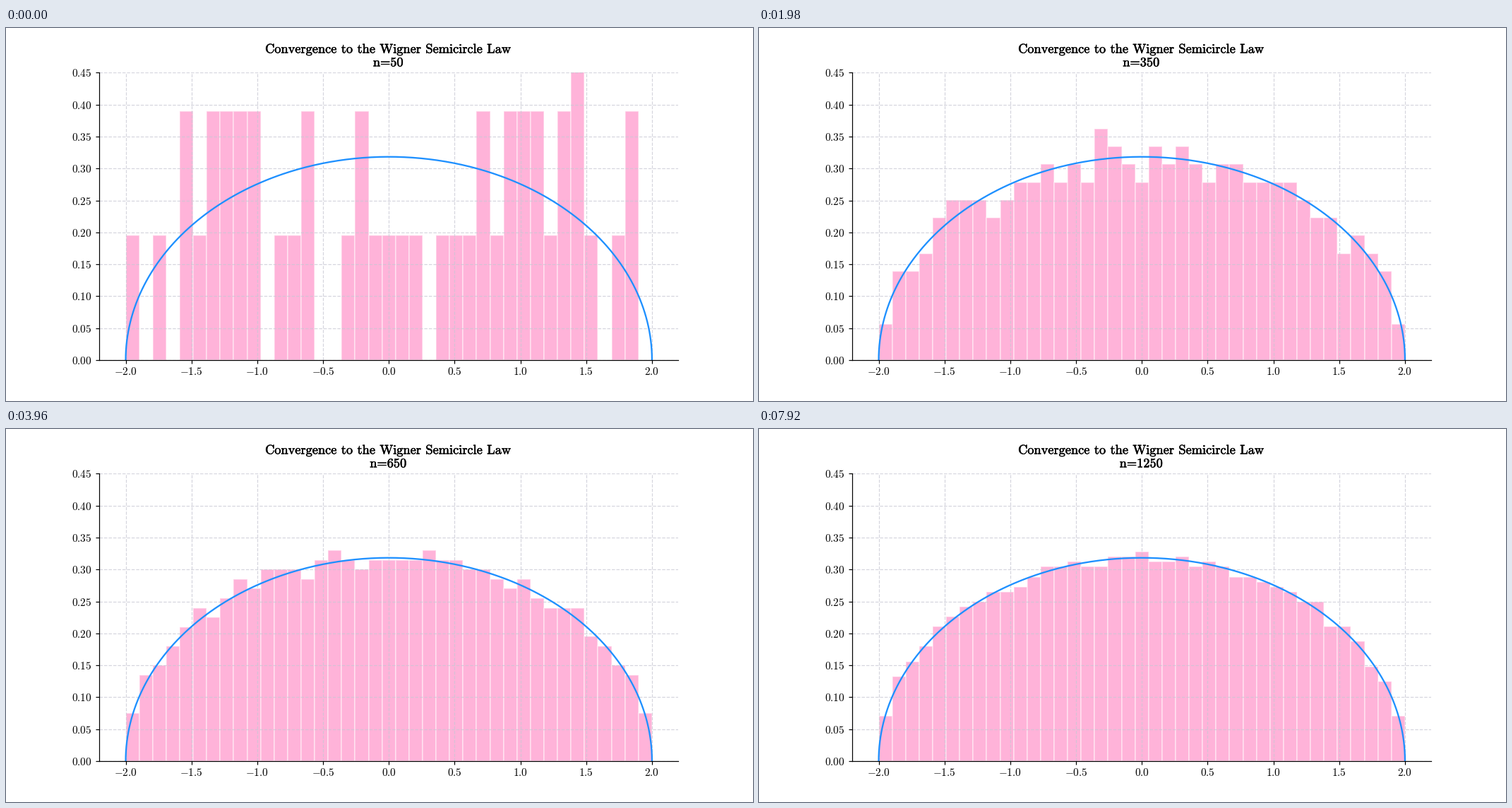
Write a matplotlib script that moves like this. It is 1058x529 px and loops after 8000 ms.

```python
import numpy as np
import matplotlib.pyplot as plt
from matplotlib.animation import FuncAnimation
from matplotlib.patheffects import withStroke

W, H, DPI = 1058, 529, 128
LOOP, TICK, HOLD = 8000, 40, 330
PT = 110 / DPI  # the chart is styled in points at 110 dpi

BINS = 39
EDGES = np.linspace(-2, 2, BINS + 1)
WIDTH = EDGES[1] - EDGES[0]
SIZES = range(50, 1251, 50)


def semicircle(x):
    return np.sqrt(np.maximum(4 - x**2, 0)) / (2 * np.pi)


def bar_heights(n):
    """Density of n eigenvalues; bin counts stray by about one from the law."""
    expected = n * WIDTH * semicircle(EDGES[:-1] + WIDTH / 2)
    noise = np.random.default_rng(n).normal(0, 0.85, BINS)
    # Bins near the rim hold few eigenvalues and stray less.
    spread = np.sqrt(expected / expected.max())
    counts = np.maximum(np.rint(expected + noise * spread), 0)
    return counts / (n * WIDTH)


def roman(text):
    """Upright Computer Modern with text-style spacing."""
    text = text.replace(" ", r"\hspace{0.4}")
    text = text.replace("=", r"\hspace{-0.2}=\hspace{-0.2}")
    return rf"$\mathrm{{{text}}}$"


plt.rcParams["mathtext.fontset"] = "cm"
HEIGHTS = [bar_heights(n) for n in SIZES]

fig = plt.figure(figsize=(W / DPI, H / DPI), dpi=DPI, facecolor="white")
ax = fig.add_axes([0.125, 0.11, 0.775, 0.77])
ax.set_xlim(-2.2, 2.2)
ax.set_ylim(0, 0.45)

xticks = np.arange(-4, 5) / 2
yticks = np.arange(10) * 0.05
ax.set_xticks(xticks, [f"${x:.1f}$" for x in xticks])
ax.set_yticks(yticks, [f"${y:.2f}$" for y in yticks])
ax.tick_params(length=3.5 * PT, width=0.8 * PT, pad=3.5 * PT, labelsize=10 * PT)
ax.tick_params(axis="x", pad=2.7 * PT)
ax.spines[["top", "right"]].set_visible(False)
ax.spines[["left", "bottom"]].set_linewidth(0.8 * PT)
ax.grid(color="#c8c8d4", alpha=0.75, linestyle="--", linewidth=0.8 * PT)

bars = ax.bar(EDGES[:-1], HEIGHTS[0], WIDTH, align="edge", color="hotpink",
              edgecolor="white", linewidth=PT, alpha=0.5)
x = 2 * np.cos(np.linspace(np.pi, 0, 400))
ax.plot(x, semicircle(x), color="dodgerblue", linewidth=1.5 * PT)


def title_line(text, baseline):
    return fig.text(0.5122, 1 - baseline / H, roman(text), fontsize=12 * PT,
                    ha="center", va="baseline",
                    path_effects=[withStroke(linewidth=0.35 * PT,
                                             foreground="black")])


title_line("Convergence to the Wigner Semicircle Law", 35.4)
size_label = title_line("n=50", 54.3)


def update(frame):
    step = min((frame * TICK + TICK // 2) // HOLD, len(SIZES) - 1)
    for bar, height in zip(bars, HEIGHTS[step]):
        bar.set_height(height)
    size_label.set_text(roman(f"n={SIZES[step]}"))
    return [*bars, size_label]


anim = FuncAnimation(fig, update, frames=LOOP // TICK, interval=TICK,
                     repeat=True, repeat_delay=0)
plt.show()
```
